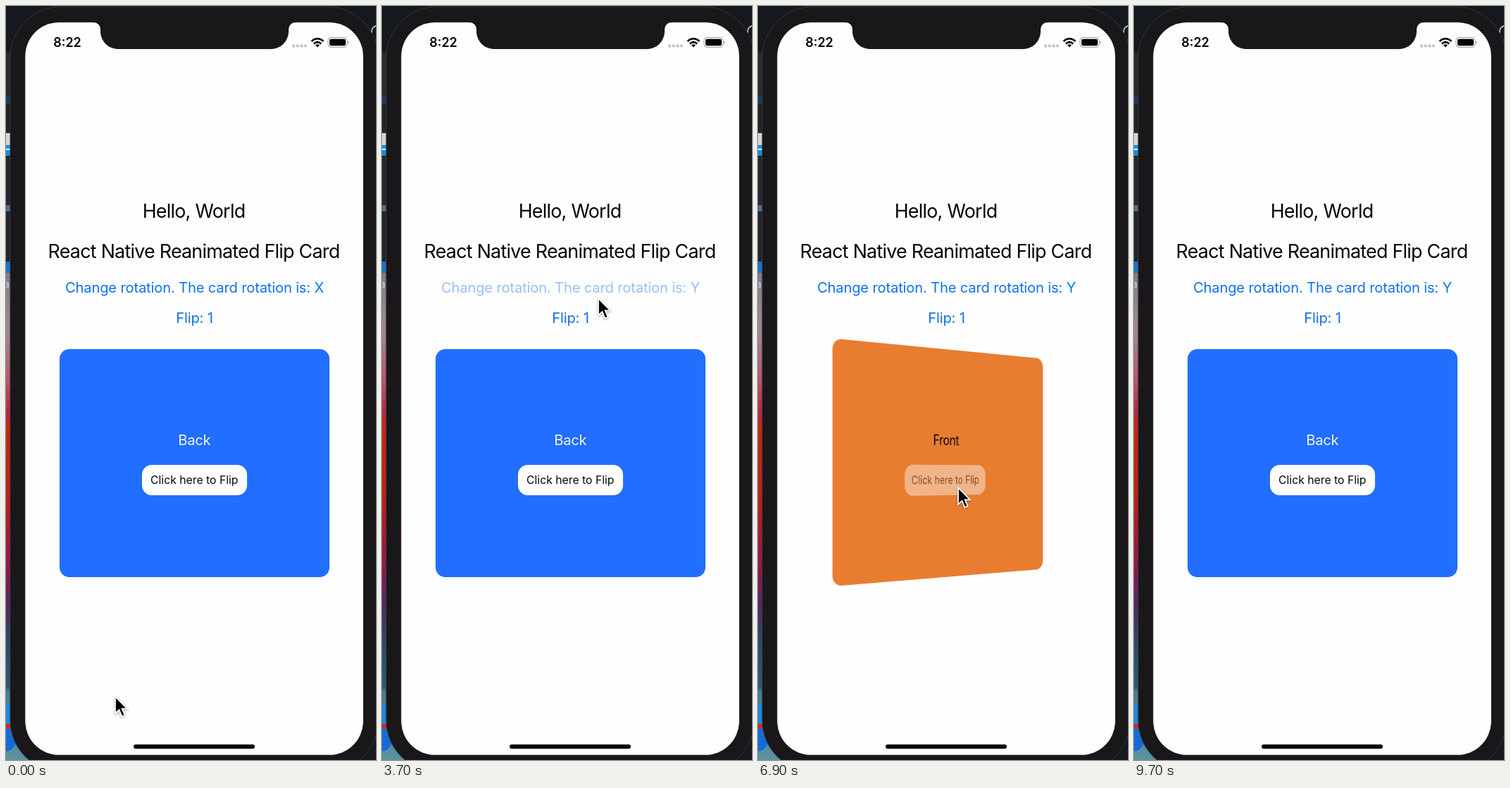
Animation, 525 px wide and 1068 px high, one loop 9.8 s. Source, as an HTML page:

```html
<!DOCTYPE html>
<html lang="en">
<head>
<meta charset="utf-8">
<title>Flip Card</title>
<style>
  html, body { margin: 0; width: 100%; height: 100%; overflow: hidden; background: #15191e; }
  #stage { position: relative; width: 525px; height: 1068px; overflow: hidden; font-family: Inter, sans-serif; }
  svg { position: absolute; left: 0; top: 0; }
  text { text-anchor: middle; }
  .title { font-size: 26.8px; letter-spacing: -.027em; fill: #050505; }
  .link { font-size: 20.2px; letter-spacing: -.009em; fill: #0f72ec; }
  #card { position: absolute; left: 75.5px; top: 486px; width: 383.5px; height: 322.5px; border-radius: 14px;
          transform-origin: 188.5px 174px; }
  #card div { position: absolute; text-align: center; white-space: nowrap; }
  #side { left: 0; width: 100%; top: 114px; line-height: 30px; font-size: 20.2px; letter-spacing: -.016em; }
  #button { left: 117.5px; top: 164px; width: 148.5px; height: 42.5px; line-height: 43px; border-radius: 14px;
            background: #fff; color: #050505; font-size: 15.7px; letter-spacing: .002em; }
  #cursor { overflow: visible; filter: drop-shadow(0 1.5px 1.5px #0006); }
</style>
</head>
<body>
<div id="stage">
  <svg width="525" height="1068">
    <defs>
      <linearGradient id="wallpaper" x1="0" y1="378" x2="0" y2="1068" gradientUnits="userSpaceOnUse">
        <stop offset="0" stop-color="#7f7f86"/>
        <stop offset=".12" stop-color="#a08891"/>
        <stop offset=".22" stop-color="#b8566c"/>
        <stop offset=".29" stop-color="#b32643"/>
        <stop offset=".31" stop-color="#c42a13"/>
        <stop offset=".46" stop-color="#bd2116"/>
        <stop offset=".6" stop-color="#92194a"/>
        <stop offset=".68" stop-color="#552563"/>
        <stop offset=".76" stop-color="#2b4c68"/>
        <stop offset=".85" stop-color="#2a5c70"/>
        <stop offset=".86" stop-color="#44808f"/>
        <stop offset="1" stop-color="#5b92a0"/>
      </linearGradient>
    </defs>

    <!-- desktop behind the phone -->
    <rect width="525" height="1068" fill="#15191e"/>
    <g id="strip"></g>
    <rect y="378" width="40" height="690" fill="url(#wallpaper)"/>
    <text x="1" y="399" font-size="14" fill="#d8d4d8">a</text>
    <rect y="990" width="9" height="28" fill="#1b8be6"/>
    <rect y="1017" width="9" height="9" fill="#d2261d"/>
    <circle cx="-2" cy="1039" r="17" fill="#1769d8"/>
    <path d="M525 28Q518 31 519 38" fill="none" stroke="#d5d7d9" stroke-width="1.5"/>

    <!-- phone -->
    <rect x="6" y="1" width="522" height="1083" rx="72" fill="#19171a" stroke="#353437"/>
    <rect x="27.3" y="23.2" width="479.5" height="1037.6" rx="48" fill="#fffeff"/>
    <path d="M124 22.5V23a10 10 0 0 1 10 10v3a25 25 0 0 0 25 25H376a25 25 0 0 0 25-25v-3a10 10 0 0 1 10-10v-.5Z" fill="#19171a"/>
    <text x="87" y="58" font-size="18" font-weight="600">8:22</text>
    <g fill="#c6c5c8">
      <circle cx="408" cy="56.5" r="2.2"/><circle cx="413.7" cy="56.5" r="2.2"/>
      <circle cx="419.3" cy="56.5" r="2.2"/><circle cx="425" cy="56.5" r="2.2"/>
    </g>
    <g fill="none" stroke="#000" stroke-width="2.6">
      <path d="M433.5 50Q442 42.5 450.5 50"/>
      <path d="M436.7 53.4Q442 48.8 447.3 53.4"/>
    </g>
    <path d="M439 55.3Q442 53 445 55.3L442 58.4Z"/>
    <rect x="457" y="44.7" width="27" height="13.6" rx="4" fill="none" stroke="#98979a"/>
    <rect x="459" y="46.7" width="23" height="9.6" rx="2.4"/>
    <path d="M485.5 49Q488.3 51.5 485.5 54Z" fill="#98979a"/>
    <rect x="181" y="1046" width="172" height="6" rx="3"/>

    <text class="title" x="266.5" y="300">Hello, World</text>
    <text class="title" x="266.5" y="357">React Native Reanimated Flip Card</text>
    <text class="link" id="axisLabel" x="267.5" y="405.5"></text>
    <text class="link" id="flipLabel" x="267.5" y="449"></text>
  </svg>

  <div id="card">
    <div id="side"></div>
    <div id="button">Click here to Flip</div>
  </div>

  <svg id="cursor" width="20" height="32">
    <path d="M0 0V24L5.5 19L9.3 28.3L13.6 26.5L9.7 17.4H17Z" stroke="#fff" stroke-width="1.8"/>
  </svg>
</div>

<script>
const LOOP = 9800, STEP = 100;
const FLIP_MS = 300, PRESS_MS = 150, RELEASE_MS = 265;
const AXIS_CHANGE = 3600;

// Every flip toggles the card; it starts flipped (back side up).
const flips = [
  { at: 1500, by: 'label' }, { at: 2592, by: 'label' }, { at: 5488, by: 'label' },
  { at: 6801, by: 'button' }, { at: 7660, by: 'button' }, { at: 8400, by: 'button' },
];

// time, x, y
const cursorPath = [
  [0, 155, 978], [300, 155, 978], [1100, 264, 439], [2900, 264, 439],
  [3400, 307, 414], [4200, 307, 414], [5000, 273, 441], [5950, 273, 441],
  [6550, 284, 682], [8600, 284, 682], [9000, 430, 39], [9100, 440, 22], [9200, 440, -60],
];

// top, bottom, colour of the windows peeking out at the left
const windows = [
  [66, 128, '#2b2b2e'], [128, 138, '#1c3b60'], [138, 180, '#232326'], [180, 197, '#d3d5d8'],
  [197, 212, '#1b8fe2'], [202, 204, '#e4eef7'], [212, 282, '#26272a'], [282, 291, '#4a6e92'],
  [291, 362, '#232529'], [362, 378, '#1674d2'],
];

const byId = id => document.getElementById(id);
const clamp = v => Math.min(1, Math.max(0, v));
const ease = v => (v = clamp(v), v < .5 ? 2 * v * v : 1 - 2 * (1 - v) ** 2);
const mix = (a, b, k) => a + (b - a) * k;

byId('strip').innerHTML = windows.map(([top, bottom, color]) =>
  `<rect y="${top}" width="12" height="${bottom - top}" fill="${color}"/>`).join('');

function pressOpacity(t, releases) {
  return Math.min(...releases.map(at => t < at
    ? 1 - .8 * ease((t - at + PRESS_MS) / PRESS_MS)
    : .2 + .8 * ease((t - at) / RELEASE_MS)));
}

function cursorAt(t) {
  const i = cursorPath.findIndex(point => point[0] > t);
  if (i < 0) return cursorPath.at(-1).slice(1);
  const [t0, x0, y0] = cursorPath[i - 1], [t1, x1, y1] = cursorPath[i];
  const k = ease((t - t0) / (t1 - t0));
  return [mix(x0, x1, k), mix(y0, y1, k)];
}

const releasesOf = by => flips.filter(flip => flip.by === by).map(flip => flip.at);
const labelReleases = releasesOf('label'), buttonReleases = releasesOf('button');

function draw(t) {
  const axis = t < AXIS_CHANGE ? 'X' : 'Y';
  let flipped = 1, progress = 1;
  for (const { at } of flips) {
    if (t < at) break;
    flipped = 1 - flipped;
    progress = mix(1 - flipped, flipped, ease((t - at) / FLIP_MS));
  }
  const showBack = progress > .5;
  const angle = 180 * progress - (showBack ? 180 : 0);

  const card = byId('card');
  card.style.transform = angle ? `perspective(1480px) rotate${axis}(${angle}deg)` : 'none';
  card.style.background = showBack ? '#226eff' : '#e87d32';
  byId('side').textContent = showBack ? 'Back' : 'Front';
  byId('side').style.color = showBack ? '#eef3ff' : '#0a0603';
  byId('button').style.opacity = pressOpacity(t, buttonReleases);

  byId('axisLabel').textContent = `Change rotation. The card rotation is: ${axis}`;
  byId('axisLabel').style.opacity = pressOpacity(t, [AXIS_CHANGE]);
  byId('flipLabel').textContent = `Flip: ${flipped}`;
  byId('flipLabel').style.opacity = pressOpacity(t, labelReleases);

  const [x, y] = cursorAt(t);
  byId('cursor').style.transform = `translate(${x}px, ${y}px)`;
}

const start = performance.now();
function tick() {
  const t = (performance.now() - start) % LOOP;
  draw(Math.floor(t / STEP) * STEP);
  requestAnimationFrame(tick);
}
tick();
</script>
</body>
</html>
```
